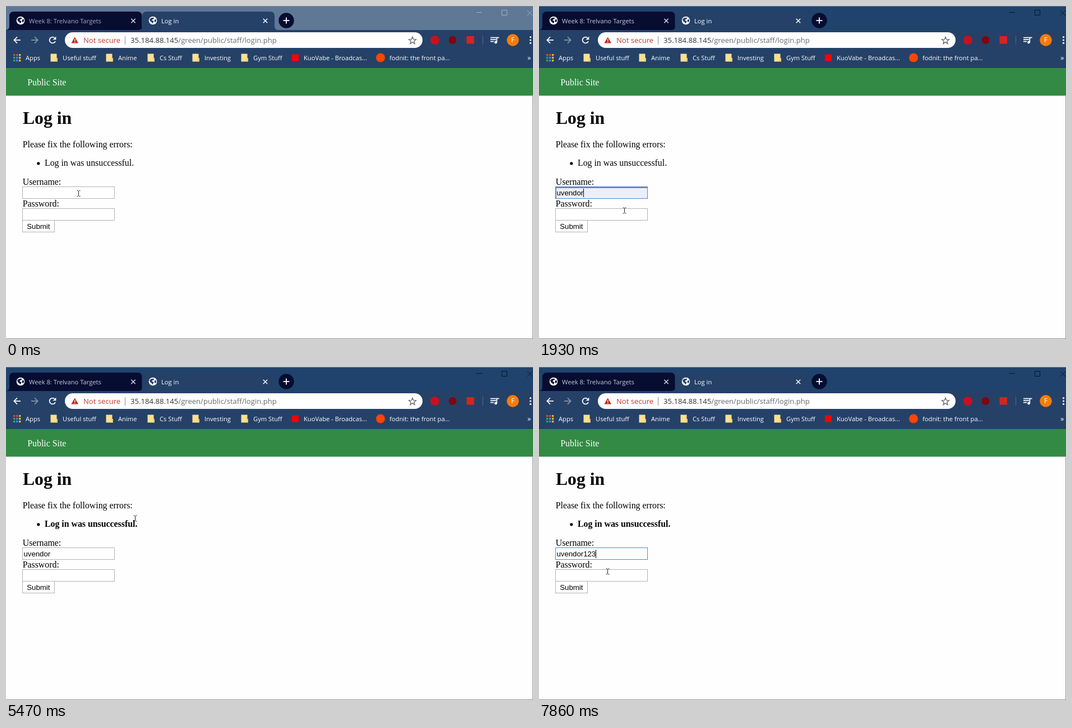
Animation, 940 px wide and 596 px high, one loop 8 s. Source, as an HTML page with a canvas:

```html
<!DOCTYPE html>
<html lang="en">
<head>
<meta charset="utf-8">
<title>Log in</title>
<style>
html, body { margin: 0; width: 100%; height: 100%; overflow: hidden; background: #fff; }
canvas { display: block; width: 940px; height: 596px; }
</style>
</head>
<body>
<canvas id="stage" width="940" height="596"></canvas>
<script>
const c = document.getElementById('stage').getContext('2d');
const LOOP = 8000;
const UI = '"Open Sans", "Noto Sans", sans-serif';
const SANS = '"Liberation Sans", Arial, sans-serif';
const SERIF = '"Liberation Serif", "Times New Roman", serif';
const BAR = '#254168', DARK = '#070d31', INK = '#000', EDGE = '#b2b2b2';
const USER = 'uvendor';
const LOGINS = [USER, 'jmaron003@hallmail.vesk.edu', 'jmaron4471@vdrs.edu',
  'rusticplorn@ozi.com', 'Cloudmarble12', 'user'];

// Pointer: time, shape, x, y (centre of the I-beam, tip of the arrow)
const POINTER = [
  [0, 'I', 129.5, 335.5], [1360, 'A', 165.5, 368.5], [1780, 'I', 163.5, 372],
  [1930, 'I', 152.5, 366], [2060, 'I', 142.5, 377], [2360, 'I', 139.5, 377],
  [3590, 'A', 102.5, 386.5], [3740, 'A', 55.5, 391.5], [3890, 'A', 53.5, 392.5],
  [4010, 'A', 51.5, 392.5], [4140, 'A', 50.5, 392.5], [4650, 'A', 75.5, 360.5],
  [4790, 'A', 138.5, 340.5], [4920, 'A', 205.5, 316.5], [5040, 'A', 233.5, 297.5],
  [5190, 'I', 232.5, 285], [5320, 'I', 230.5, 275], [5470, 'I', 230.5, 271],
  [5590, 'I', 229.5, 274], [5890, 'I', 160.5, 280], [6010, 'I', 88.5, 281],
  [6160, 'I', 65.5, 278], [6280, 'I', 66.5, 290], [6410, 'I', 90.5, 308],
  [6530, 'I', 112.5, 323.5], [6780, 'I', 112.5, 325.5], [6930, 'I', 111.5, 329.5],
  [7580, 'A', 120.5, 354.5], [7860, 'I', 122.5, 366]
];
const DOTS = [[0, 0], [3590, 1], [3890, 2], [4010, 4], [4140, 5], [4260, 7], [4530, 0]];
const NAME = [[0, ''], [1360, USER], [7710, USER + '12'], [7860, USER + '123']];
const FOCUS = [[0, ''], [400, 'name'], [2610, 'pass'], [4530, ''], [7200, 'name']];
const CARET = [[0, 0], [400, 1], [960, 0], [1360, 1], [2360, 0], [2610, 1],
  [3040, 0], [3470, 1], [4530, 0], [7200, 1]];

const at = (keys, t) => keys.filter(k => k[0] <= t).pop();
const val = (keys, t) => at(keys, t)[1];
const within = (t, a, b) => t >= a && t < b;

function rect(x, y, w, h, color) {
  c.fillStyle = color;
  c.fillRect(x, y, w, h);
}
function frame(x, y, w, h, color) {
  c.strokeStyle = color;
  c.lineWidth = 1;
  c.strokeRect(x + .5, y + .5, w - 1, h - 1);
}
function disc(x, y, r, color) {
  c.fillStyle = color;
  c.beginPath();
  c.arc(x, y, r, 0, 7);
  c.fill();
}
function round(x, y, w, h, r, color) {
  c.fillStyle = color;
  c.beginPath();
  c.roundRect(x, y, w, h, r);
  c.fill();
}
function trace(pts, closed) {
  c.beginPath();
  for (let i = 0; i < pts.length; i += 2) c.lineTo(pts[i], pts[i + 1]);
  if (closed) c.closePath();
}
function poly(pts, color) {
  trace(pts, true);
  c.fillStyle = color;
  c.fill();
}
function line(pts, color, w = 1) {
  trace(pts);
  c.strokeStyle = color;
  c.lineWidth = w;
  c.stroke();
}
function text(s, x, y, size, family, color, weight = 400) {
  c.font = `${weight} ${size}px ${family}`;
  c.fillStyle = color;
  c.fillText(s, x, y);
}
function cross(x, y, r, color, w) {
  line([x - r, y - r, x + r, y + r], color, w);
  line([x - r, y + r, x + r, y - r], color, w);
}

function globe(x, y, back) {
  disc(x, y, 7.3, '#fff');
  c.save();
  c.translate(x, y);
  poly([-6, -2, -3.5, -4.5, 1.5, -5.5, 2, -3, -1, -2, -1.5, 0, 1.5, 1, 1, 3, -1, 5.5, -2, 3, -4.5, 1.5], back);
  poly([3, -1.5, 5.5, -2.5, 6, 1, 4, 3.5, 2.5, 1], back);
  c.restore();
}
function spinner(x, y, t) {
  const a = t / 160;
  c.strokeStyle = '#fff';
  c.lineWidth = 2;
  c.beginPath();
  c.arc(x, y, 6.5, a, a + 4);
  c.stroke();
}
function tab(l, r, color) {
  c.fillStyle = color;
  c.beginPath();
  c.moveTo(l - 7, 43);
  c.quadraticCurveTo(l, 43, l, 36);
  c.lineTo(l, 18);
  c.quadraticCurveTo(l, 10, l + 8, 10);
  c.lineTo(r - 8, 10);
  c.quadraticCurveTo(r, 10, r, 18);
  c.lineTo(r, 36);
  c.quadraticCurveTo(r, 43, r + 7, 43);
  c.fill();
}

function tabs(t) {
  const live = t >= 400;
  rect(0, 0, 940, 44, live ? '#1f436c' : '#5f7896');
  rect(0, 0, 940, 1, live ? '#6b7f96' : '#7b8794');
  tab(6, 242.5, DARK);
  tab(243, 479, BAR);
  globe(26, 26, DARK);
  text('Week 8: Trelvano Targets', 41, 31, 11.2, UI, live ? '#c5ccd9' : '#a3abbc');
  cross(227, 26.5, 3.7, '#d5dae3', 1.5);
  if (within(t, 4400, 4790)) spinner(262, 26, t);
  else globe(262, 26, BAR);
  text('Log in', 277, 31, 11.2, UI, '#fff');
  cross(462.5, 26.5, 3.7, '#fff', 1.5);
  disc(500, 26, 13.7, DARK);
  line([494.5, 26, 505.5, 26], '#fff', 1.8);
  line([500, 20.5, 500, 31.5], '#fff', 1.8);
  const ctl = live ? '#0b1626' : '#a3b0bf';
  line([839, 11.5, 849, 11.5], ctl);
  frame(884, 7, 10, 10, ctl);
  cross(934.5, 12.5, 4.7, ctl, 1);
}

function toolbar() {
  rect(0, 43, 940, 68, BAR);
  line([26, 61, 14.5, 61], '#fff', 1.7);
  line([20, 55.3, 14.3, 61, 20, 66.7], '#fff', 1.7);
  line([45, 61, 56.5, 61], '#8796ad', 1.7);
  line([51, 55.3, 56.7, 61, 51, 66.7], '#8796ad', 1.7);
  c.strokeStyle = '#fff';
  c.lineWidth = 1.8;
  c.beginPath();
  c.arc(83, 61, 5.4, .4, 5.4);
  c.stroke();
  poly([89.3, 54.5, 89.3, 60.3, 83.5, 60.3], '#fff');

  round(105, 47, 638, 28, 14, '#fff');
  poly([122.7, 55.5, 129, 66.5, 116.4, 66.5], '#c5281f');
  rect(122, 59.3, 1.4, 3.4, '#fff');
  rect(122, 63.8, 1.4, 1.4, '#fff');
  text('Not secure', 138, 66, 13.1, UI, '#c5372f');
  rect(212, 54, 1, 15, '#8a8d91');
  const ip = '35.184.88.145';
  text(ip, 222, 66, 13.1, UI, '#303236');
  text('/green/public/staff/login.php', 222 + c.measureText(ip).width, 66, 13.1, UI, '#666a6e');
  const star = [];
  for (let i = 0; i < 10; i++) {
    const r = i % 2 ? 2.9 : 6.8, a = i * Math.PI / 5 - Math.PI / 2;
    star.push(725 + r * Math.cos(a), 62 + r * Math.sin(a));
  }
  trace(star, true);
  c.strokeStyle = '#5f6368';
  c.lineWidth = 1.3;
  c.stroke();

  disc(765, 61, 8, '#c8101f');
  disc(796.5, 61, 7, '#800610');
  rect(821.5, 54, 13.5, 13.5, '#d6241f');
  rect(850, 53, 1, 16, '#4e668a');
  for (const [y, w] of [[56.5, 10], [60, 10], [63.5, 6]]) rect(864, y - .8, w, 1.7, '#fff');
  disc(873.5, 65, 2.4, '#fff');
  rect(874.5, 55.7, 1.7, 9.5, '#fff');
  rect(874.5, 55.7, 5, 1.7, '#fff');
  disc(904, 61, 10.7, '#f57c0a');
  text('F', 901, 65, 11.8, UI, '#fff');
  for (const y of [55.7, 61, 66.3]) disc(935.5, y, 1.6, '#fff');
}

function bookmarks() {
  const dots = ['#ea4335', '#ea4335', '#fbbc05', '#34a853', '#4285f4', '#fbbc05', '#34a853', '#4285f4', '#fbbc05'];
  dots.forEach((col, i) => rect(13 + i % 3 * 5, 86 + Math.floor(i / 3) * 5, 3.3, 3.3, col));
  const label = (s, x) => text(s, x, 97, 11.2, UI, '#fff');
  label('Apps', 35);
  [['Useful stuff', 101], ['Anime', 200], ['Cs Stuff', 274], ['Investing', 354], ['Gym Stuff', 441]]
    .forEach(([s, x]) => {
      rect(x - 21.5, 85.5, 11, 14, '#fbe08d');
      rect(x - 11.5, 93, 2.5, 6.5, '#f0cc6a');
      label(s, x);
    });
  rect(510, 86.5, 12, 12, '#f00');
  label('KuoVabe - Broadcas...', 531);
  disc(668, 92.5, 8, '#ff4500');
  label('fodnit: the front pa...', 684);
  text('»', 930, 97, 13, UI, '#fff');
}

function field(y, focused, filled) {
  rect(29, y, 165, 22, '#fff');
  if (filled) {
    rect(29, y, 165, 22, '#f0f0f0');
    rect(30, y + 1, 163, 20, '#e8f0fe');
    rect(29, y + (focused ? 1 : 0), 164, 2, '#85878c');
    rect(29, y + 1, 2, 20, '#85878c');
  }
  if (focused) frame(29, y, 165, 22, '#4c86dc');
  else if (!filled) frame(29, y, 165, 22, EDGE);
}

function form(t) {
  const focus = val(FOCUS, t), name = val(NAME, t), n = val(DOTS, t);
  const serif = (s, x, y, weight) => text(s, x, y, 15.84, SERIF, INK, weight);
  text('Log in', 30, 211, 31.68, SERIF, INK, 700);
  serif('Please fix the following errors:', 29.7, 253);
  disc(57.8, 281.8, 2.6, INK);
  serif('Log in was unsuccessful.', 69, 286, t < 4530 ? 400 : 700);
  serif('Username:', 29.7, 320);
  serif('Password:', 29.7, 359);

  field(323, focus === 'name', within(t, 1360, 4530));
  text(name, 31.5, 339, 13.2, SANS, INK);
  const nameEnd = 31.5 + c.measureText(name).width;
  const hover = within(t, 3740, 4530);
  rect(29, 383, 58, 22, hover ? '#f5f5f5' : '#fff');
  frame(29, 383, 58, 22, hover ? '#8c8c8c' : EDGE);
  text('Submit', 37.3, 399, 13.2, SANS, INK);
  field(362, focus === 'pass', false);
  for (let i = 0; i < n; i++) disc(34.2 + i * 4.6, 373, 1.8, INK);

  if (within(t, 7200, 7710)) {
    const wave = [];
    for (let x = 32; x <= 78; x += 2) wave.push(x, x % 4 ? 341.7 : 340);
    line(wave, '#e02020');
  }
  if (val(CARET, t)) {
    if (focus === 'pass') rect(n ? Math.round(31.3 + n * 4.6) : 32, 366, 1, 14, INK);
    else if (t < 1780) rect(31.5, 327, 1.5, 15, INK);
    else rect(Math.round(nameEnd - .5), 327, 1, 15, INK);
  }
}

function popup(items, width, bottom, picked) {
  c.save();
  c.beginPath();
  c.rect(26, 348, width + 8, 240);
  c.clip();
  c.shadowColor = 'rgba(0,0,0,.42)';
  c.shadowBlur = 1.6;
  c.shadowOffsetY = .6;
  round(29.5, 340, width, bottom - 340, 4, '#fff');
  c.restore();
  rect(30, 346, width - 1, 6, '#fff');
  if (picked) rect(29.5, 353, width, 36, '#c6c6c6');
  items.forEach((s, i) => text(s, 41.3, Math.round(376 + i * 35.55), 12.1, UI, '#1c1c1c', 600));
}

function pointer(t) {
  const [, shape, x, y] = at(POINTER, t);
  if (shape === 'I') {
    line([x, y - 4.5, x, y + 4.5], '#222');
    for (const s of [-5, 5]) {
      line([x - 3, y + s, x - .8, y + s], '#222');
      line([x + .8, y + s, x + 3, y + s], '#222');
    }
    return;
  }
  c.save();
  c.translate(x, y);
  trace([0, 0, 0, 9.5, 2.2, 7.5, 3.7, 11, 5.2, 10.3, 3.8, 7, 6.7, 6.7], true);
  c.fillStyle = '#fff';
  c.fill();
  c.strokeStyle = '#222';
  c.lineWidth = .8;
  c.stroke();
  c.restore();
}

function draw(now) {
  const t = now % LOOP;
  rect(0, 0, 940, 596, '#fefefe');
  tabs(t);
  toolbar();
  bookmarks();
  rect(0, 111, 940, 49.5, '#338a44');
  text('Public Site', 38.3, 142, 15.84, SERIF, '#fff');
  form(t);
  if (within(t, 400, 1780)) popup(LOGINS, 213.5, 575.5, t >= 1360);
  if (within(t, 7200, 7710)) popup([USER, USER + '12'], 189.5, 433.5);
  if (within(t, 7710, 7860)) popup([USER + '12'], 189.5, 398.5);
  rect(939, 161, 1, 435, '#9a9a9a');
  rect(0, 595, 940, 1, '#8e8e8e');
  pointer(t);
}

const start = performance.now();
function tick() {
  draw(performance.now() - start);
  requestAnimationFrame(tick);
}
tick();
</script>
</body>
</html>
```
